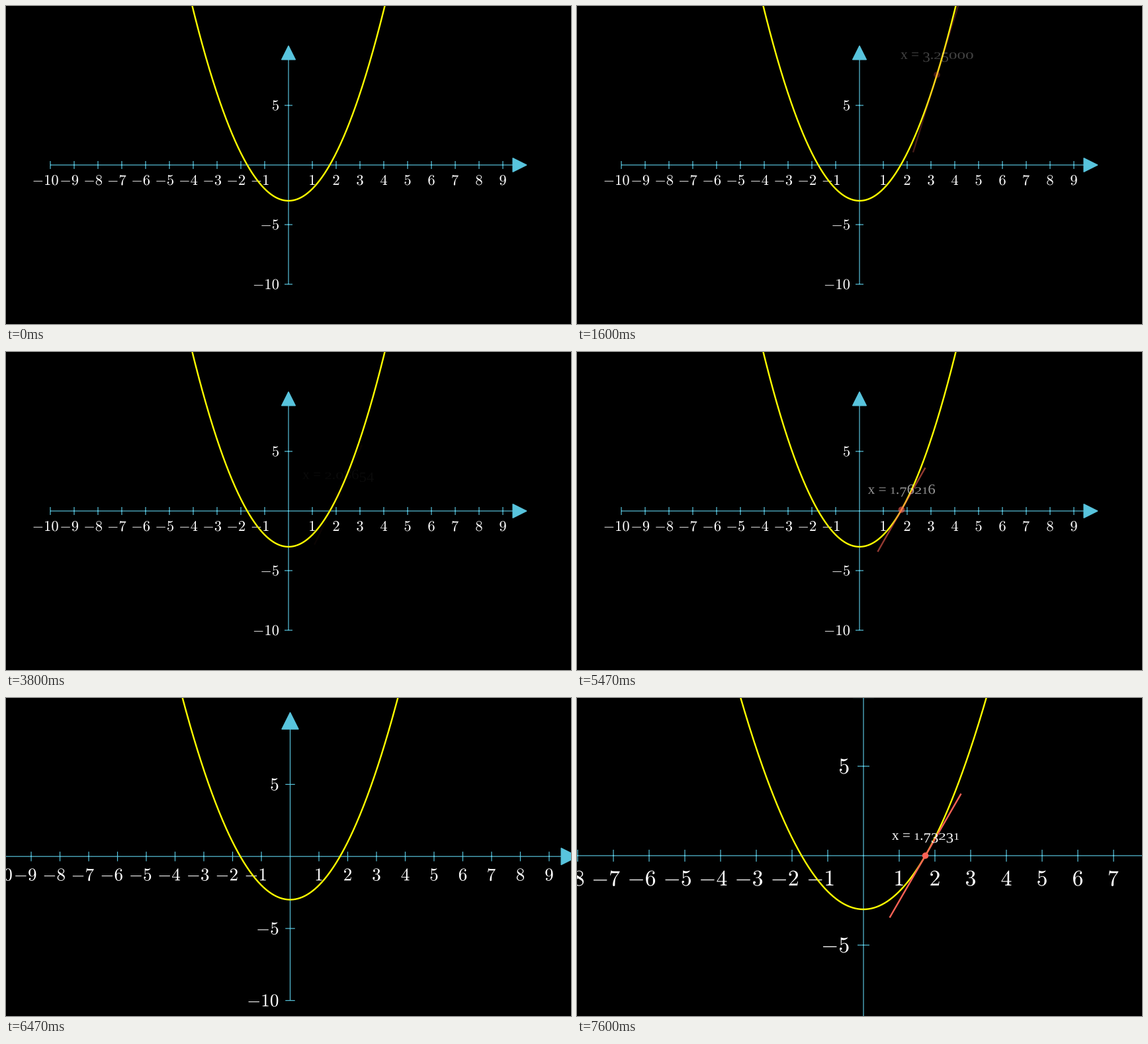
Recreate the animation shown at these times as a matplotlib script. Size 854 px wide and 480 px high, loop 8000 ms.

```python
import numpy as np
import matplotlib
import matplotlib.pyplot as plt
from matplotlib.animation import FuncAnimation
from matplotlib.patches import Circle, PathPatch, Polygon
from matplotlib.path import Path
from matplotlib.textpath import TextPath
from matplotlib.transforms import Affine2D

matplotlib.rcParams["mathtext.fontset"] = "cm"

W, H, FPS, FRAMES = 854, 480, 15, 120
BLUE, YELLOW, RED = "#58C4DD", "#FFFF00", "#FC6255"
OX, OY, UX, UY = 427, 240, 36, 18      # origin and unit sizes
ZOOM_CENTER = np.array([415, 244])
PX = 0.72                              # points per pixel at 100 dpi

# the small excess keeps the pixel size from being rounded down
fig = plt.figure(figsize=((W + 0.01) / 100, (H + 0.01) / 100), dpi=100,
                 facecolor="black")
ax = fig.add_axes([0, 0, 1, 1])
ax.set_xlim(0, W)
ax.set_ylim(H, 0)
ax.axis("off")

zoom = Affine2D()
zoomed = zoom + ax.transData


def px(x, y):
    return OX + UX * x, OY - UY * y


def f(x):
    return x * x - 3


def smooth(t):
    def sig(v):
        return 1 / (1 + np.exp(-v))
    t = np.clip(t, 0, 1)
    lo = sig(-5)
    return float(np.clip((sig(10 * (t - 0.5)) - lo) / (1 - 2 * lo), 0, 1))


def place(path, x, y, hx, hy):
    """Move a path so that the point (hx, hy) of its box lies at (x, y)."""
    b = path.get_extents()
    return path.transformed(Affine2D().translate(
        x - b.x0 - hx * b.width, y - b.y0 - hy * b.height))


def number(n):
    return TextPath((0, 0), f"${n}$", size=22.5).transformed(Affine2D().scale(1, -1))


# --- axes ---
def segment(a, b):
    return Path([a, b])


TIP, TICK = 21, 6
xs = [n for n in range(-10, 10) if n]
ys = [-10, -5, 5]
lines = [segment(px(-10, 0), (OX + 360 - TIP, OY)),
         segment(px(0, -10), (OX, OY - 180 + TIP))]
labels = []
minus = number("-").get_extents().width
for n in xs:
    x, y = px(n, 0)
    lines.append(segment((x, y - TICK), (x, y + TICK)))
    labels.append(place(number(n), x - (minus / 2 if n < 0 else 0), y + 15, 0.5, 0))
for n in ys:
    x, y = px(0, n)
    lines.append(segment((x - TICK, y), (x + TICK, y)))
    labels.append(place(number(n), x - 15, y, 1, 0.5))

ax.add_patch(PathPatch(Path.make_compound_path(*lines), fill=False, ec=BLUE,
                       lw=1.2 * PX, capstyle="butt", snap=False, transform=zoomed))
for tip, (dx, dy) in ((px(10, 0), (1, 0)), (px(0, 10), (0, -1))):
    base = np.array(tip) - TIP * np.array([dx, dy])
    side = TIP / 2 * np.array([-dy, dx])
    ax.add_patch(Polygon([tip, base + side, base - side], fc=BLUE, ec=BLUE,
                         lw=1.2 * PX, joinstyle="miter", snap=False, transform=zoomed))
ax.add_patch(PathPatch(Path.make_compound_path(*labels), fc="white", lw=0,
                       snap=False, transform=zoomed))

# --- curve ---
cx = np.linspace(-5, 5, 400)
ax.plot(*px(cx, f(cx)), color=YELLOW, lw=2.4 * PX, transform=zoomed, zorder=2)

# --- caption with old-style figures ---
SIZE = 21.3
DROP = 4.3


def glyphs(s):
    return TextPath((0, 0), s, size=SIZE, prop={"family": "Liberation Serif"})


def advance(c):
    return glyphs(f"n{c}n").get_extents().width - glyphs("nn").get_extents().width


def figure_style(c):
    """Horizontal scale, vertical scale and drop below the baseline."""
    if c in "012":
        return {"0": 1.18, "1": 0.84, "2": 1.07}[c], 0.7, 0
    if c.isdigit():
        return 1.07, 1, DROP if c in "34579" else 0
    return 1, 1, 0


def caption(x):
    parts, pen = [], 0
    for c in f"x = {x:.5f}":
        sx, sy, drop = figure_style(c)
        if c != " ":
            parts.append(glyphs(c).transformed(
                Affine2D().scale(sx, -sy).translate(pen, drop)))
        pen += advance(c) * sx
    path = Path.make_compound_path(*parts)
    b = path.get_extents()
    return path.transformed(Affine2D().translate(-(b.x0 + b.x1) / 2, 0))


# --- Newton steps ---
guesses = [3.25]
for _ in range(3):
    g = guesses[-1]
    guesses.append(g - f(g) / (2 * g))
captions = [caption(g) for g in guesses]

tangent, = ax.plot([], [], color=RED, lw=2.4 * PX, solid_capstyle="butt",
                   transform=zoomed, zorder=3)
dot = ax.add_patch(Circle((0, 0), 4.8, fc=RED, lw=0, zorder=4))
text = ax.add_patch(PathPatch(captions[0], fc="white", lw=0, snap=False, zorder=5))


def state(k):
    """Step index, opacity and zoom factor at frame k."""
    t = k / FPS
    if t < 6:
        step, u = int(k // 30), (k % 30) / FPS
        return step, smooth(u / 0.5) if u < 1 else 1 - smooth(u - 1), 1
    return 3, smooth((t - 7) / 0.5), 1 + 0.5 * smooth(t - 6)


def draw(k):
    step, alpha, s = state(k)
    zoom.clear().translate(*-ZOOM_CENTER).scale(s).translate(*ZOOM_CENTER)
    g = guesses[step]
    ends = np.array([g - 1, g + 1])
    tangent.set_data(*px(ends, f(g) + 2 * g * (ends - g)))
    x, y = zoom.transform(px(g, f(g)))
    dot.set_center((x, y))
    text.set_path(captions[step].transformed(Affine2D().translate(x, y - 24)))
    for part in (tangent, dot, text):
        part.set_alpha(alpha)
        part.set_visible(alpha > 0)
    return tangent, dot, text


anim = FuncAnimation(fig, draw, frames=FRAMES, interval=1000 / FPS,
                     repeat=True, repeat_delay=0, blit=False)
plt.show()
```
